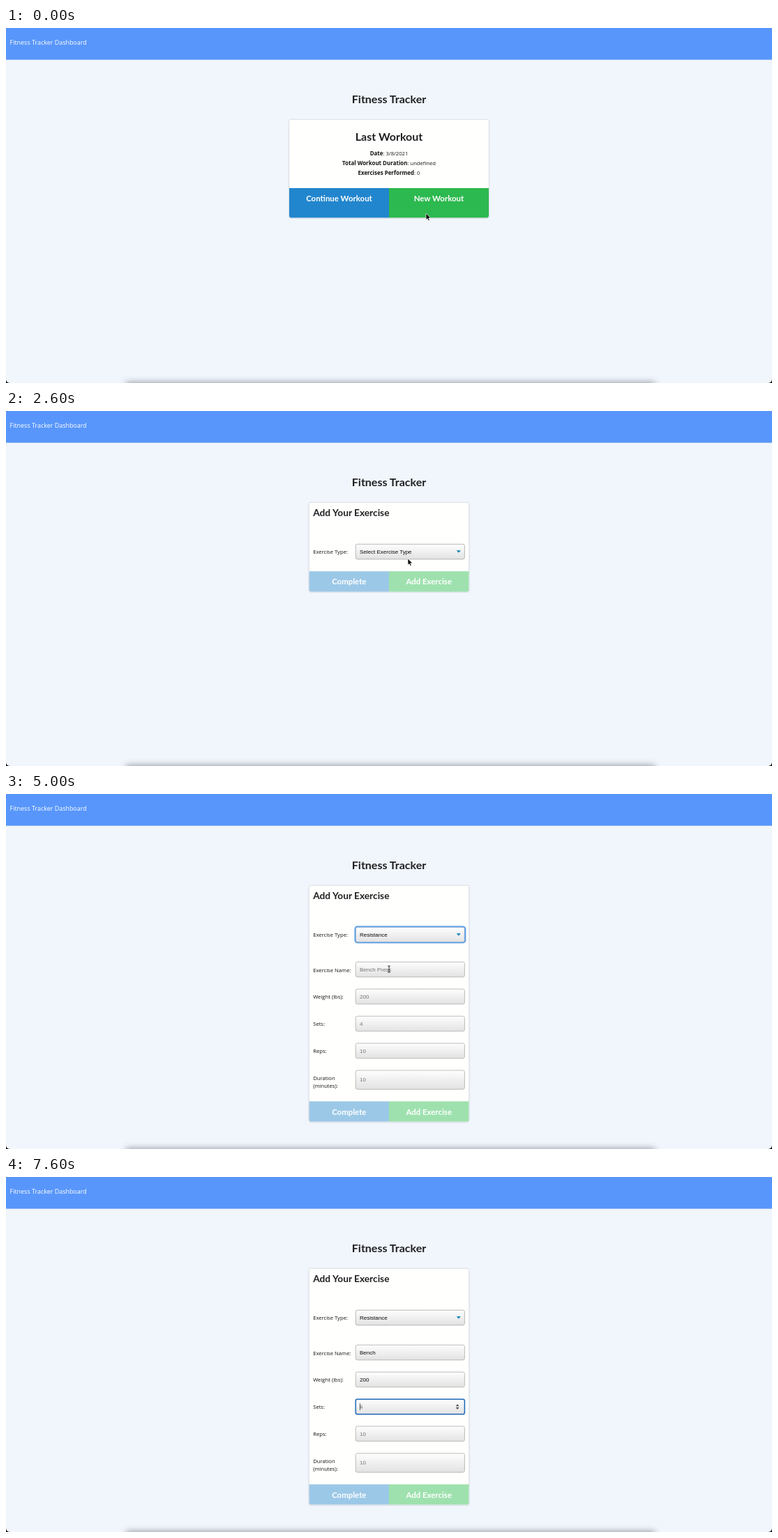
These frames come from a looping animation (1098x510 px, 8 s). An HTML page:

```html
<!DOCTYPE html>
<html lang="en">
<head>
<meta charset="utf-8">
<title>Fitness Tracker</title>
<style>
html, body { margin: 0; width: 100%; height: 100%; overflow: hidden; background: #f1f6fc; }
svg { display: block; width: 100%; height: 100%; }
text { white-space: pre; }
.head { font: 700 16px Lato, sans-serif; fill: #1f2022; text-anchor: middle; }
.sub { font: 700 13.73px Lato, sans-serif; fill: #1f2022; }
.btn { font: 700 11.44px Lato, sans-serif; fill: #fff; text-anchor: middle; }
.body { font: 7.65px "Open Sans", sans-serif; fill: #161616; }
.body b, .bold { font-weight: 700; font-size: 7.95px; }
.mid { text-anchor: middle; }
.nav { font: 8.95px "Open Sans", sans-serif; fill: #fff; }
.field { font: 8px "Liberation Sans", Arial, sans-serif; fill: #0c0c0c; }
.hint { fill: #757575; }
.menu { font: 500 7.35px Inter, sans-serif; fill: #f2f3f4; }
.status { font: 6.5px Inter, sans-serif; fill: #d6d7d9; }
</style>
</head>
<body>
<svg id="stage" viewBox="0 0 1098 510" preserveAspectRatio="none" xmlns="http://www.w3.org/2000/svg">
  <defs>
    <linearGradient id="box" x2="0" y2="1">
      <stop stop-color="#fefefe"/><stop offset="1" stop-color="#e2e2e2"/>
    </linearGradient>
    <linearGradient id="pop" x2="0" y2="1">
      <stop stop-color="#5f6468"/><stop offset="1" stop-color="#56605d"/>
    </linearGradient>
    <linearGradient id="pick" x2="0" y2="1">
      <stop stop-color="#4fa0ec"/><stop offset="1" stop-color="#3f92e4"/>
    </linearGradient>
    <filter id="soft" x="-10%" y="-10%" width="120%" height="120%"><feGaussianBlur stdDeviation="1.3"/></filter>
    <filter id="dock" x="-5%" y="-150%" width="110%" height="400%"><feGaussianBlur stdDeviation="5"/></filter>
  </defs>
  <rect width="1098" height="510" fill="#f1f6fc"/>
  <rect width="1098" height="45.6" fill="#5896fb"/>
  <text class="nav" x="5.6" y="23.8">Fitness Tracker Dashboard</text>
  <text class="head" x="549" y="108">Fitness Tracker</text>
  <g id="home"></g>
  <g id="form"></g>
  <rect x="172" y="509" width="758" height="24" fill="#4a4c58" opacity=".55" filter="url(#dock)"/>
  <path d="M0 504.5Q.3 509.6 5.5 510H0ZM1098 504.5Q1097.7 509.6 1092.5 510H1098Z" fill="#0a0a0c"/>
  <g id="status">
    <path d="M0 498.2H82.4Q84.4 498.2 84.4 500.2V510H0Z" fill="#3a3b3e"/>
    <text class="status" x="2.6" y="506.5">localhost:3000/exercise</text>
  </g>
  <path id="arrow" d="M0 0V9.3L2.1 7.4 3.6 10.7 5.2 10 3.8 6.8H6.7Z" fill="#050505" stroke="#fff" stroke-width=".7" stroke-linejoin="round"/>
  <path id="beam" d="M-2-4.8Q0-4.8 0-3.4Q0-4.8 2-4.8M0-3.6V3.6M-2 4.8Q0 4.8 0 3.4Q0 4.8 2 4.8M-1 .9H1" fill="none" stroke="#222" stroke-width=".9"/>
</svg>
<script>
const LOOP = 8000, STEP = 200;
const $ = id => document.getElementById(id);

const rect = (x, y, w, h, fill, extra = '') =>
  `<rect x="${x}" y="${y}" width="${w}" height="${h}" fill="${fill}" ${extra}/>`;
const text = (x, y, cls, s) => `<text x="${x}" y="${y}" class="${cls}">${s}</text>`;

function card(x, w, bottom, top, colors, labels) {
  const y = 131.7, r = 2.4, h = bottom - top;
  const half = 549 - x, right = x + w;
  return rect(x, y + .6, w, bottom - y, '#b9bec9', 'rx="2.4" filter="url(#soft)"') +
    rect(x - .3, y - .3, w + .6, bottom - y + .6, '#fffffd', `rx="${r}" stroke="#d3d6de" stroke-width=".6"`) +
    `<path d="M${x} ${top}h${half}v${h}H${x + r}q${-r} 0 ${-r} ${-r}Z" fill="${colors[0]}"/>` +
    `<path d="M549 ${top}H${right}v${h - r}q0 ${r} ${-r} ${r}H549Z" fill="${colors[1]}"/>` +
    labels.map((s, i) => text(549 + (i ? .5 : -.5) * half, top + 19, 'btn', s)).join('');
}

function stat(y, name, value) {
  return `<text class="body mid" x="549" y="${y}"><tspan class="bold">${name}</tspan>: ${value}</text>`;
}

$('home').innerHTML =
  card(406, 286, 272.5, 230, ['#2286ce', '#2cb94f'], ['Continue Workout', 'New Workout']) +
  text(549, 162.2, 'head', 'Last Workout') +
  stat(183, 'Date', '3/8/2021') +
  stat(196.7, 'Total Workout Duration', 'undefined') +
  stat(210.5, 'Exercises Performed', '0');

// label, top, height, placeholder
const FIELDS = [
  ['Exercise Name:', 241.3, 21.6, 'Bench Press'],
  ['Weight (lbs):', 280.2, 21.6, '200'],
  ['Sets:', 319.2, 21.6, '4'],
  ['Reps:', 358.1, 21.6, '10'],
  ['Duration', 397, 27.2, '10']
];

function input(y, h, focused) {
  const line = focused ? 'stroke="#1c68b8" stroke-width="1.5"' : 'stroke="#adadad" stroke-width=".8"';
  return rect(501.2, y, 156.2, h, 'url(#box)', `rx="2.6" ${line}`);
}

function field(i, typed, focused) {
  const [label, y, h, hint] = FIELDS[i];
  const base = y + h / 2 + 2.8;
  let out = text(440.2, i == 4 ? 411 : base + .6, 'body', label) + input(y, h, focused) +
    text(507, base, typed ? 'field' : 'field hint', typed || hint);
  if (i == 4) out += text(440.2, 422, 'body', '(minutes):');
  if (focused) {
    const width = typed ? ruler(typed) : 0;
    out += rect(507 + width, base - 7.6, .7, 9.6, '#111');
    if (i) out += `<path d="M644.7 ${base - 3.6}l2.4-2.8 2.4 2.8ZM644.7 ${base - 1.9}l2.4 2.8 2.4-2.8Z" fill="#444"/>`;
  }
  return out;
}

const pen = document.createElement('canvas').getContext('2d');
function ruler(s) {
  pen.font = '8px "Liberation Sans", Arial, sans-serif';
  return pen.measureText(s).width;
}

function select(value, ring) {
  return (ring ? rect(500.5, 190.5, 157.8, 23, 'none', 'rx="3.4" stroke="#62a3ea" stroke-width="2.2"') : '') +
    rect(501.2, 191.3, 156.2, 21.6, 'url(#box)', `rx="2.6" stroke="${ring ? '#5f92cb' : '#a6a6a6'}" stroke-width=".8"`) +
    text(507, 204.8, 'field', value) +
    '<path d="M645.7 200.2h6.2l-3.1 3.5Z" fill="#0a83b6"/>';
}

function popup(row) {
  const tops = [195.4, 208.3, 221.4];
  return rect(495, 192.4, 159, 46.4, '#556', 'rx="3.5" opacity=".45" filter="url(#soft)"') +
    rect(495.3, 191.7, 158.4, 46.2, 'url(#pop)', 'rx="3.4" stroke="#484c50" stroke-width=".6"') +
    (row ? rect(498.8, tops[row], 151.6, 13.2, 'url(#pick)') : '') +
    '<path d="M502.3 202.6l1.5 1.9 2.7-5" fill="none" stroke="#a9adb0" stroke-width=".9"/>' +
    `<text class="menu" x="509.5" y="204.7" style="fill:#a9adb0">Select Exercise Type</text>` +
    text(509.5, 217.6, 'menu', 'Resistance') + text(509.5, 230.8, 'menu', 'Cardio');
}

const typedAt = (s, start, t) => s.slice(0, Math.max(0, Math.floor((t - start) / STEP) + 1));

function drawForm(t) {
  const open = t >= 4000;
  const bottom = open ? 470.6 : 259.4;
  let out = card(434.6, 228.8, bottom, open ? 441.6 : 230.2, ['#9cc8e7', '#9ee1ae'], ['Complete', 'Add Exercise']) +
    text(440.2, 151, 'sub', 'Add Your Exercise') +
    text(440.2, 205.4, 'body', 'Exercise Type:') +
    select(open ? 'Resistance' : 'Select Exercise Type', t >= 2800 && t < 5600);
  if (open) {
    const name = t >= 6400 ? 'Bench' : typedAt('Bench', 5800, t);
    const values = [name, typedAt('200', 7000, t), '', '', ''];
    const active = t < 5600 ? -1 : t < 6600 ? 0 : t < 7600 ? 1 : 2;
    out += values.map((v, i) => field(i, v, i == active)).join('');
  } else if (t >= 2800) {
    out += popup(t >= 3400 ? 1 : 0);
  }
  return out;
}

// time, x, y of the pointer
const PATH = [
  [0, 602, 266.3], [600, 618, 247.8], [1400, 618, 247.8], [2000, 607.6, 234.5],
  [2200, 604, 230], [2800, 562, 203], [3200, 552, 211], [3600, 551.2, 222],
  [3800, 550, 217], [4000, 549, 219], [4400, 549, 248.5], [4600, 549, 251.2], [5000, 549, 251.6]
];

function pointer(t) {
  const i = PATH.findIndex(p => p[0] > t);
  if (i < 0) return PATH[PATH.length - 1].slice(1);
  const [a, ax, ay] = PATH[i - 1], [b, bx, by] = PATH[i];
  const k = (t - a) / (b - a);
  return [ax + (bx - ax) * k, ay + (by - ay) * k];
}

const show = (id, on) => $(id).setAttribute('display', on ? 'inline' : 'none');

let last = -1;
function update(now) {
  const t = Math.floor(now % LOOP / STEP) * STEP;
  if (t !== last) {
    last = t;
    const onForm = t >= 1400;
    show('home', !onForm);
    show('form', onForm);
    if (onForm) $('form').innerHTML = drawForm(t);
    show('status', t >= 1200 && t < 2400);
    show('arrow', t < 4400);
    show('beam', t >= 4400 && t < 5800);
    const at = `translate(${pointer(t)})`;
    $('arrow').setAttribute('transform', at);
    $('beam').setAttribute('transform', at);
  }
  requestAnimationFrame(() => update(performance.now()));
}
update(performance.now());
</script>
</body>
</html>
```
